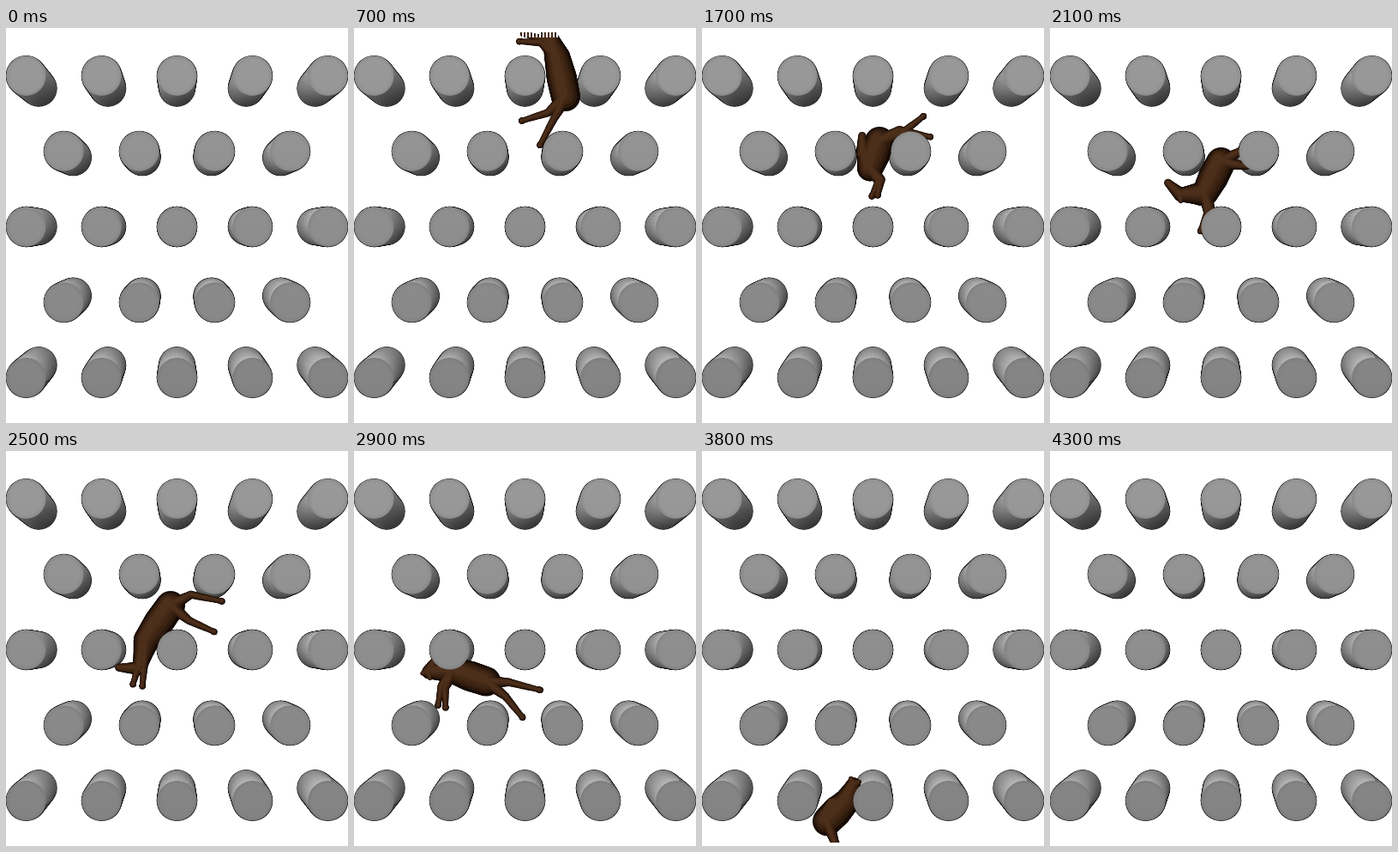
An HTML page with a canvas for the animation above (4.35 s loop, 399 px wide and 460 px high).

```html
<!DOCTYPE html>
<html lang="en">
<head>
<meta charset="utf-8">
<title>Horse falling through pegs</title>
<style>
  html, body { margin: 0; width: 100%; height: 100%; overflow: hidden; background: #fff; }
  canvas { position: absolute; left: 0; top: 0; }
</style>
</head>
<body>
<canvas id="sides" width="399" height="460"></canvas>
<canvas id="horse" width="399" height="460"></canvas>
<canvas id="faces" width="399" height="460"></canvas>
<script>
const LOOP = 4350, STEP = 50, TAU = Math.PI * 2;
const ctx = id => document.getElementById(id).getContext('2d');
const sides = ctx('sides'), stage = ctx('horse'), faces = ctx('faces');
const mix = (a, b, p) => a + (b - a) * p;
const polar = ([x, y], deg, len) => {
  const a = deg * TAU / 360;
  return [x + len * Math.cos(a), y + len * Math.sin(a)];
};

function disc(c, x, y, r, fill) {
  c.fillStyle = fill;
  c.beginPath();
  c.arc(x, y, r, 0, TAU);
  c.fill();
}

// Pegs: a front face and a back end drawn toward the vanishing point
const EYE = { x: 199.5, y: 230 }, DEPTH = 0.916, FRONT = 23, BACK = 20.6;
const grey = v => `rgb(${v},${v},${v})`;

function drawPeg(x, y) {
  const bx = mix(EYE.x, x, DEPTH), by = mix(EYE.y, y, DEPTH);
  for (let i = 0; i <= 20; i++) {
    const p = i / 20;
    disc(sides, mix(x, bx, p), mix(y, by, p), mix(FRONT, BACK, p) + 0.8, '#0c0c0c');
  }
  disc(sides, bx, by, BACK, '#666');
  const n = 90;
  for (let i = 0; i < n; i++) {
    const a = i / n * TAU, b = (i + 1.3) / n * TAU;
    const lit = -0.5 * Math.cos(a) - 0.86 * Math.sin(a);
    const front = polar([x, y], i / n * 360, FRONT), back = polar([bx, by], i / n * 360, BACK);
    const g = sides.createLinearGradient(...front, ...back);
    g.addColorStop(0, grey(Math.round(132 + 52 * lit)));
    g.addColorStop(1, grey(Math.round(92 + 42 * lit)));
    sides.fillStyle = g;
    sides.beginPath();
    sides.arc(x, y, FRONT, a, b);
    sides.arc(bx, by, BACK, b, a, true);
    sides.fill();
  }
  const g = faces.createLinearGradient(0, 32, 0, 431);
  g.addColorStop(0, '#999');
  g.addColorStop(1, '#838383');
  disc(faces, x, y, FRONT, g);
  const rim = faces.createRadialGradient(x, y, FRONT * 0.8, x, y, FRONT);
  rim.addColorStop(0, 'rgba(90,90,90,0)');
  rim.addColorStop(1, 'rgba(90,90,90,.18)');
  disc(faces, x, y, FRONT, rim);
}

for (let row = 0; row < 5; row++) {
  const odd = row % 2;
  for (let i = 0; i < 5 - odd; i++) drawPeg(23.5 + 44 * odd + 88 * i, 55.7 + 87.9 * row);
}

// Hip place, body heading, foreshortening, and joint angles relative to the body
const KEYS = [
  { t: 700, x: 247, y: 80, body: -102, size: 0.95, neck: -8, head: 0, fore: -35, foreBend: -40, hind: -140, hindBend: 0, split: 20 },
  { t: 1100, x: 211, y: 117, body: -52, size: 1, neck: -8, head: -7, fore: 76, foreBend: 37, hind: -199, hindBend: -36, split: -85 },
  { t: 1700, x: 207, y: 132, body: 109, size: 0.68, neck: 141, head: 15, fore: -64, foreBend: 58, hind: -139, hindBend: 43, split: 10 },
  { t: 2500, x: 192, y: 180, body: 125, size: 1, neck: -21, head: 78, fore: -30, foreBend: 0, hind: -153, hindBend: 40, split: 67 },
  { t: 3350, x: 112, y: 368, body: 281, size: 0.65, neck: -23, head: 180, fore: -145, foreBend: -55, hind: -245, hindBend: -20, split: 0 }
];
const START = 300, END = 4150, FIRST = KEYS[0], LAST = KEYS[KEYS.length - 1];

function poseAt(t) {
  if (t < FIRST.t) {
    const p = (t - START) / (FIRST.t - START);
    return { ...FIRST, y: FIRST.y - 160 * (1 - p * p) };
  }
  if (t >= LAST.t) {
    const p = (t - LAST.t) / (END - LAST.t);
    return { ...LAST, x: LAST.x + 44 * Math.sin(p * TAU / 4), y: LAST.y + 200 * p * p, body: LAST.body + 60 * p };
  }
  const k = KEYS.findIndex(key => t < key.t);
  const a = KEYS[k - 1], b = KEYS[k], p = (t - a.t) / (b.t - a.t);
  return Object.fromEntries(Object.keys(a).map(name => [name, mix(a[name], b[name], p)]));
}

// Parts are chains of [point, radius]
function buildHorse(pose) {
  const { body, size, split } = pose;
  const hip = [pose.x, pose.y];
  const mid = polar(hip, body, 24 * size), chest = polar(hip, body, 49 * size);
  const neck = body + pose.neck, face = neck + pose.head;
  const poll = polar(chest, neck, 34 * size), muzzle = polar(poll, face, 24 * size);
  const leg = (root, angle, bend, upper, lower) => {
    const knee = polar(root, angle, upper), hoof = polar(knee, angle + bend, lower);
    return [[root, 8], [knee, 4.6], [hoof, 3.2], [polar(hoof, angle + bend, 2), 3.6]];
  };
  const fore = body + pose.fore, hind = body + pose.hind;
  const ear = side => [[poll, 6], [polar(poll, face + 180 + side * 45, 8), 2]];
  return [
    leg(chest, fore + 12, pose.foreBend, 27 * size, 25 * size),
    leg(hip, hind + split, 25 - pose.hindBend, 28, 30),
    [[hip, 17], [mid, 17.5], [chest, 15], [polar(chest, neck, 17 * size), 11], [poll, 8], [muzzle, 4.5]],
    ear(-1), ear(1),
    leg(chest, fore, pose.foreBend, 27 * size, 25 * size),
    leg(hip, hind, pose.hindBend, 27, 35)
  ];
}

// Each coat layer covers the whole animal, from dark outline to lit centre
const COAT = ['#170c06', '#2e1b0e', '#3c2414', '#452a18', '#4d301c'];

function drawChain(chain, scale) {
  for (let i = 1; i < chain.length; i++) {
    const [a, ra] = chain[i - 1], [b, rb] = chain[i];
    for (let s = 0; s <= 16; s++) {
      const p = s / 16, r = mix(ra, rb, p), lift = r * (1 - scale) * 0.3;
      disc(stage, mix(a[0], b[0], p) - lift, mix(a[1], b[1], p) - lift, r * scale, stage.fillStyle);
    }
  }
}

function drawHorse(t) {
  stage.clearRect(0, 0, 399, 460);
  if (t < START || t >= END) return;
  const parts = buildHorse(poseAt(t));
  stage.save();
  stage.beginPath();
  stage.rect(0, 5, 399, 451);
  stage.clip();
  COAT.forEach((color, i) => {
    stage.fillStyle = color;
    parts.forEach(part => drawChain(part, 1 - 0.17 * i));
  });
  // ragged upper edge of the view
  for (let x = 0; x < 399; x += 4) stage.clearRect(x, 5, 2, 6);
  stage.restore();
}

function tick() {
  const t = performance.now() % LOOP;
  drawHorse(Math.floor(t / STEP) * STEP);
  requestAnimationFrame(tick);
}
tick();
</script>
</body>
</html>
```
